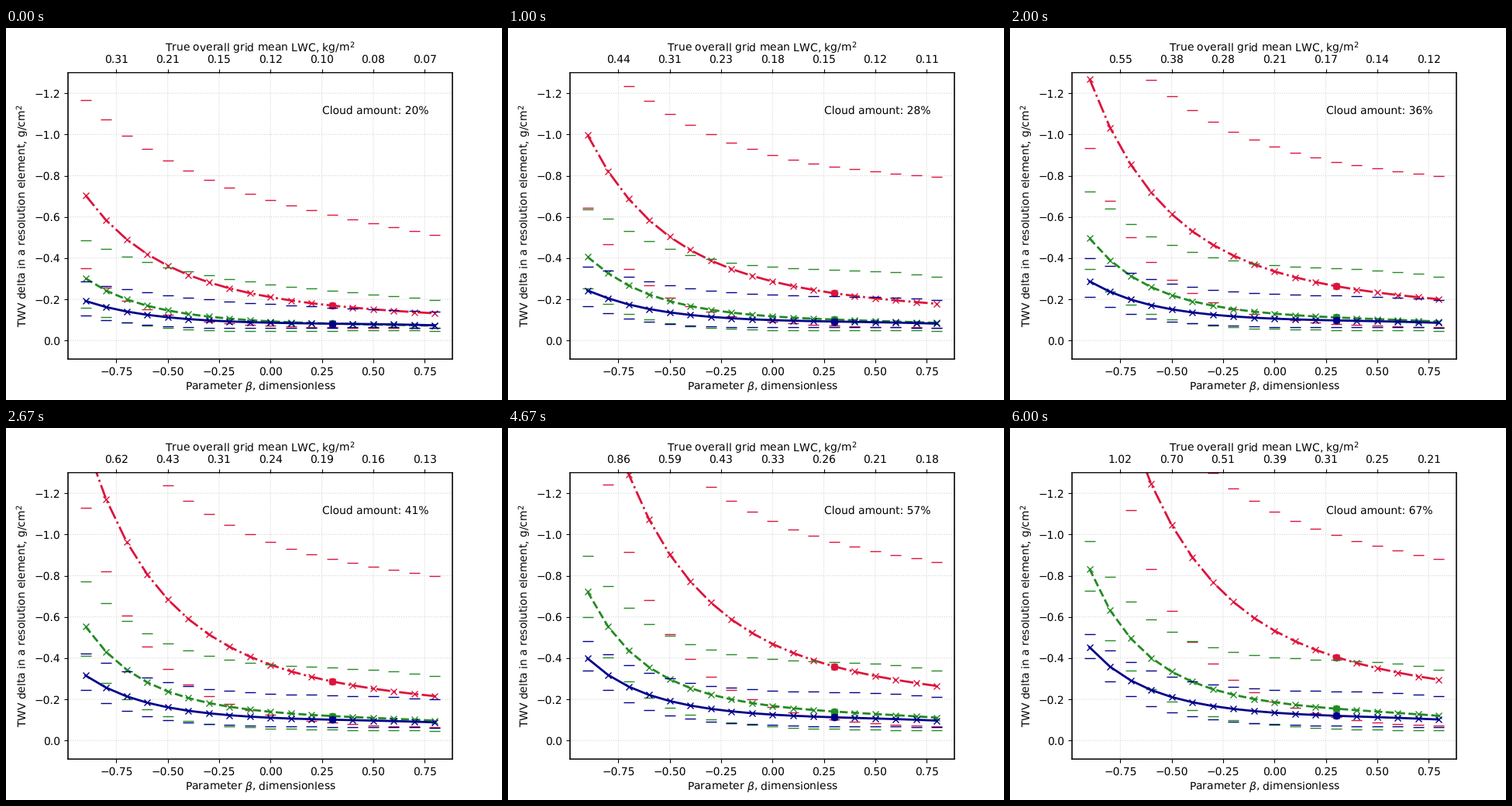
Animation of 640x480 px, one loop 6.33 s. Source, as a matplotlib script:

```python
import numpy as np
import matplotlib.pyplot as plt
from matplotlib.animation import FuncAnimation

FRAMES, LOOP_MS = 19, 6330
BETA = np.linspace(-0.9, 0.8, 18)
ACROSS = np.linspace(0, 1, 18)
KNOTS = [-0.9, -0.5, 0.2, 0.8]
TICKS = np.arange(-0.75, 0.76, 0.25)
MARK = 12  # index of beta = 0.3

plt.rcParams.update({"font.family": "DejaVu Sans", "path.snap": False,
                     "text.hinting": "none"})
fig, ax = plt.subplots(figsize=(6.4, 4.8), dpi=100)
top = ax.twiny()


def decay(*values):
    """Log-cubic curve over BETA through the values at the knots."""
    return np.exp(np.polyval(np.polyfit(KNOTS, np.log(values), 3), BETA))


def blend(pair, progress):
    start, end = pair
    return -(start + (end - start) * progress)


class Series:
    """A mean line between two rows of dashes, each a (first, last) pair of curves."""

    def __init__(self, color, style, mean, low, high, power, reach):
        self.curves = mean, low, high
        self.power, self.reach = power, ACROSS ** reach
        self.mean, = ax.plot(BETA, BETA, style, color=color, marker="x", lw=2)
        self.dot, = ax.plot([BETA[MARK]], [0], "o", color=color)
        self.low, self.high = (
            ax.plot(BETA, BETA, "_", color=color, ms=10)[0] for _ in range(2))

    def update(self, step):
        s = step / (FRAMES - 1)
        # Upper dashes grow smoothly on the left, in two jumps on the right.
        jumps = np.interp(step, [0, 3, 11, 14, 18], [0, 0.76, 0.79, 0.96, 1])
        upper = (1 - self.reach) * s ** self.power + self.reach * jumps
        mean, low, high = self.curves
        middle = blend(mean, 0.8 * s + 0.2 * upper)
        self.mean.set_ydata(middle)
        self.dot.set_ydata([middle[MARK]])
        self.low.set_ydata(blend(low, s))
        self.high.set_ydata(blend(high, upper))


red = Series(
    "crimson", "-.", power=0.8, reach=1,
    mean=(decay(.705, .363, .181, .132), decay(2.32, 1.045, .440, .295)),
    low=(decay(.352, .125, .065, .060), decay(2.1, .628, .133, .071)),
    high=(decay(1.166, .872, .631, .511), decay(2.25, 1.50, 1.028, .882)))
green = Series(
    "forestgreen", "--", power=0.65, reach=0.5,
    mean=(decay(.302, .146, .085, .072), decay(.833, .334, .163, .120)),
    low=(decay(.159, .061, .047, .046), decay(.727, .188, .062, .049)),
    high=(decay(.485, .355, .252, .197), decay(.968, .526, .394, .344)))
blue = Series(
    "darkblue", "-", power=0.65, reach=0.5,
    mean=(decay(.192, .113, .083, .074), decay(.453, .211, .124, .102)),
    low=(decay(.120, .070, .062, .060), decay(.400, .137, .073, .064)),
    high=(decay(.287, .220, .165, .139), decay(.517, .310, .241, .216)))


def water_content(step):
    """Liquid water content at the top ticks: a power law in beta."""
    keys = [0, 3, 6, 18]
    scale = np.interp(step, keys, [0.1193, 0.184, 0.212, 0.387])
    power = np.interp(step, keys, [1.72, 1.595, 1.731, 1.778])
    return scale * (1 + TICKS / 1.78) ** -power


for axis in (ax, top):
    axis.set_xlim(-0.985, 0.885)
    axis.set_xticks(TICKS)
ax.set_ylim(0.09, -1.3)
ax.set_yticks(np.arange(-1.2, 0.1, 0.2).round(1))
ax.grid(ls=":", color="lightgrey")
ax.set_xlabel(r"Parameter $\beta$, dimensionless", labelpad=2.8)
ax.set_ylabel("TWV delta in a resolution element, g/cm$^2$")
top.set_xlabel("True overall grid mean LWC, kg/m$^2$", labelpad=2.8)
amount = ax.text(0.25, -1.1, "")


def update(step):
    for series in (red, green, blue):
        series.update(step)
    top.set_xticklabels([f"{v:.2f}" for v in water_content(step)])
    amount.set_text(f"Cloud amount: {20 + 47 * step / (FRAMES - 1):.0f}%")


anim = FuncAnimation(fig, update, frames=FRAMES, init_func=lambda: update(0),
                     interval=LOOP_MS / FRAMES, repeat=True, repeat_delay=0)
plt.show()
```
